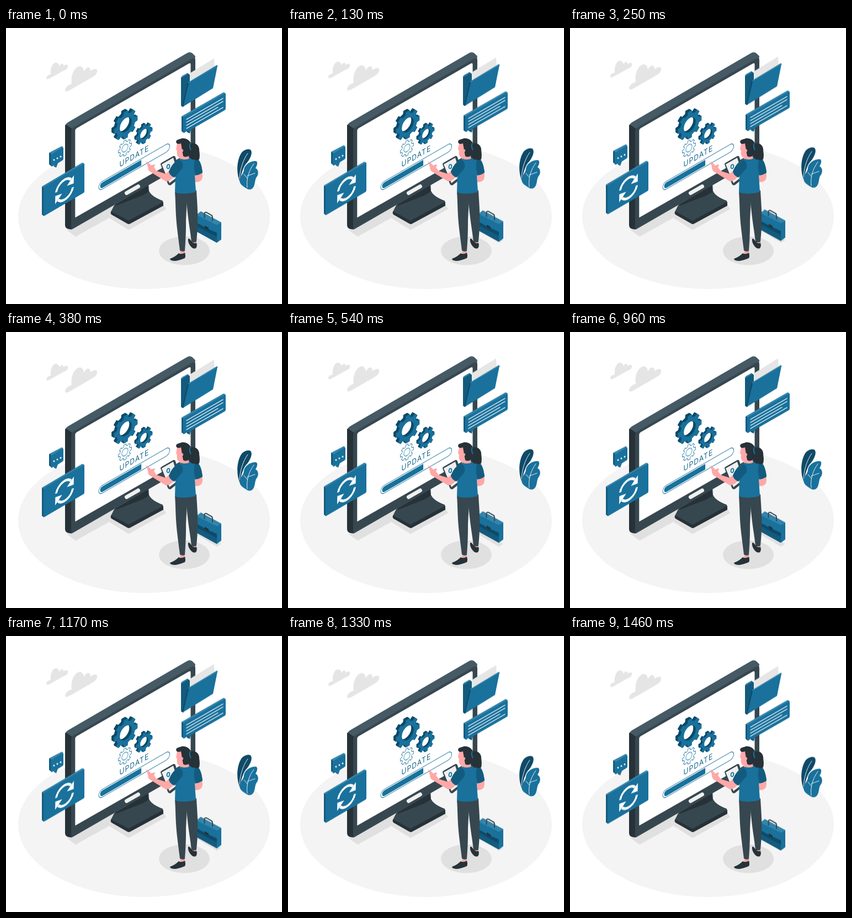
An HTML page for the animation above (1.5 s loop, 500 px wide and 500 px high).

```html
<!DOCTYPE html>
<html lang="en">
<head>
<meta charset="utf-8">
<title>Update</title>
<style>
  html, body { margin: 0; width: 100%; height: 100%; overflow: hidden; background: #fff; }
  svg { display: block; width: 100vw; height: 100vh; }
  .blue { fill: #19719c; }
  .light { fill: #3485ab; }
  .mid { fill: #135b7e; }
  .deep { fill: #0f4a68; }
  .night { fill: #263238; }
  .slate { fill: #37474f; }
  .steel { fill: #455a64; }
  .skin { fill: #ffa8a7; }
  .shade { fill: #e0e0e0; }
  .line { fill: none; stroke: #fff; stroke-linecap: round; stroke-linejoin: round; }
  .thin { fill: #fff; stroke: #19719c; }
  #float { animation: float 1.5s linear infinite; }
  @keyframes float {
    0%, 100% { transform: translateY(0); }
    50% { transform: translateY(-10px); }
  }
  text { font: 400 14px Inter, "Open Sans", sans-serif; letter-spacing: 1.2px; fill: #17658c; }
</style>
</head>
<body>
<svg viewBox="0 0 500 500" xmlns="http://www.w3.org/2000/svg">
  <g id="ground">
    <ellipse cx="250" cy="341.300" rx="228" ry="131.600" fill="#f4f4f4"/>
    <path class="shade" d="M110 366L126 378L187 344L222 366L290 328L284 318L200 315L118 362Z"/>
    <ellipse class="shade" cx="323" cy="403.500" rx="46" ry="26"/>
    <path class="shade" d="M344 366L382 389L390 384L352 362Z"/>
  </g>

  <g id="monitor">
    <path class="slate" d="M196 321L243 294V287L258 279L259 295Q263 305 284 313L285 318L222 351L190 333Z"/>
    <path class="night" d="M190 332L222 349L285 315V322L224 355Q222 356 219 354L191 338Q189 336 190 332Z"/>
    <path class="night" d="M197 320L243 293L257 284L258 297L246 304L199 322Z"/>
    <path class="steel" d="M107 177Q108 174 112 171L327 46Q333 42 338 46L343 51L342 58L120 187Z"/>
    <path class="night" d="M107 177Q107 174 110 176L119 182V365L112 364Q107 362 107 357Z"/>
    <path class="slate" d="M118 187Q118 183 122 180L336 56Q343 52 343 58V236L121 364Q118 366 118 362Z"/>
    <path fill="#fff" d="M125.300 186Q125.300 183 128 181.500L331 64.500Q334.500 62.500 334.500 66V224L125.300 343.500Z"/>
    <path class="line" stroke-width="7" style="stroke:#f0f0f0" d="M218.500 299L239.500 287"/>
  </g>

  <g id="screen">
    <g transform="matrix(.866 -.5 0 1 205.500 252.500)"><text>UPDATE</text></g>
    <g transform="matrix(.866 -.5 0 1 168 288.500)">
      <rect class="thin" y="-7" width="148.500" height="14" rx="7"/>
      <path class="blue" d="M8 -5H89V5H8A5 5 0 0 1 8 -5Z"/>
    </g>
  </g>

  <g id="float">
    <g fill="#e5e5e5">
      <path d="M74 93C71 88 76 85 81 84C80 75 83 65 89 63C93 62 96 65 97 69C100 63 105 64 104 69C108 65 114 66 112 71C111 75 107 76 103 78L78 92Z"/>
      <path d="M108 115C105 109 111 104 119 101C117 88 122 73 132 69.500C137 68 141 73 141 79C146 69 153 69 153 78C159 73 167 73 165 79C164 85 158 88 153 91L113 114Z"/>
    </g>

    <g id="folder">
      <path class="mid" d="M317 90L319 87L329 81.500L333 85V110L321 143L317 141Z"/>
      <path class="light" d="M317 89L328 82L330 83L319 90Z"/>
      <path fill="#e6e6e6" d="M333 82L377 55L378 72L334 98Z"/>
      <path class="light" d="M329 99L382 67L384 69L331 101Z"/>
      <path class="blue" d="M330 100L383 69L375 109L320 143Z"/>
      <path class="deep" d="M329 99L331 100L321 143L319 142Z"/>
    </g>

    <g id="note">
      <path class="light" d="M318 160L394 116.500L398 118L322 163Z"/>
      <path class="mid" d="M318 160L322 162V190L318 187Z"/>
      <path class="blue" d="M321 163Q321 162 323 161L396 118.500Q398 118 398 120V146Q398 148 396 149L335 184L333 191L327 187L323 190Q321 190 321 188Z"/>
      <path class="deep" d="M327 188L333 191L330 186Z"/>
      <path class="line" stroke-width="1.300" d="M327 165.500L393 127.500M327 171L393 133M327 176.500L384 143.500M327 182L393 144"/>
    </g>

    <g id="chat">
      <path class="light" d="M78 226L101 214L104 216L81 229Z"/>
      <path class="mid" d="M78 226L82 228V250L78 247Z"/>
      <path class="blue" d="M81 229L102 216.500Q104 216 104 218V237Q104 239 102 240L94 245L91 253L88 248L83 251Q81 251 81 249Z"/>
      <path class="deep" d="M88 248L91 253L86 250Z"/>
      <g fill="#fff"><circle cx="87" cy="239" r="1.500"/><circle cx="93" cy="236" r="1.500"/><circle cx="99" cy="233" r="1.500"/></g>
    </g>

    <g id="panel">
      <path class="light" d="M65 287L138 244L142 245L69 289Z"/>
      <path class="mid" d="M65 287L69 289V341L65 338Z"/>
      <path class="blue" d="M68 290Q68 288 70 287L140 246Q142 245 142 247V296Q142 298 140 299L70 340Q68 341 68 339Z"/>
      <g transform="matrix(.866 -.5 0 1 106 293)" id="sync"></g>
    </g>

    <g id="plant">
      <path class="deep" d="M423 277C417 262 418 240 426 227C431 220 441 217 444 222C447 228 441 240 434 247C429 254 426 266 423 277Z"/>
      <path class="blue" d="M438 292C430 287 423 284 423 275C425 266 431 264 431 256C433 246 445 240 453 241C457 243 455 249 452 254C458 256 458 266 454 270C450 276 452 284 447 290C444 293 441 293 438 292Z"/>
      <path class="line" stroke-width=".9" d="M423 273C424 255 430 238 438 227M437 289C435 274 440 258 449 246M437 268L451 263M437 272L431 265"/>
    </g>

    <g id="case">
      <path class="light" d="M344 339L353 332L390 352L382 358Z"/>
      <path class="blue" d="M344 338L382 357V389L344 368Z"/>
      <path class="mid" d="M344 352L364 363L382 371V389L344 368Z"/>
      <path class="deep" d="M344 352L364 363L382 371V378L364 369L344 358Z"/>
      <path class="blue" d="M382 357L390 352V383L382 389Z"/>
      <path class="night" d="M360 358L367 362V366L360 362Z"/>
      <path fill="none" stroke="#37474f" stroke-width="2" d="M359.500 344V336Q360 333 363 334L372 339Q374 340 374 343V350"/>
    </g>
  </g>

  <g id="woman">
    <path class="skin" d="M337 380H345V392L338 391Z"/>
    <path class="night" d="M330 382Q332 380 335 385Q340 392 345 389Q347 395 344 399Q339 401 335 396Q329 389 330 382Z"/>
    <path class="skin" d="M315 400H324V411L316 412Z"/>
    <path class="night" d="M297 418Q306 415 313 408Q318 411 324 407Q326 413 324 417Q314 421 307 422Q297 422 297 418Z"/>
    <path class="slate" d="M324 298L345 294C346 314 348 334 347 350C347 366 346 377 345 387Q340 390 336 387C334 367 330 350 327 314Z"/>
    <path class="slate" d="M306 297L329 298C328 316 326 340 326 354C326 376 325 390 324 404Q319 406 315 403C313 385 309 360 308 340C307 320 307 310 306 297Z"/>

    <path class="slate" d="M280 247Q280 245 282 244L303 232Q306 231 307 234L317 270L298 285Q294 285 293 282Z"/>
    <path fill="#f0f0f0" d="M282 247L303 235L313 268L296 281Z"/>
    <ellipse class="thin" cx="294" cy="251" rx="2.300" ry="3.600" stroke-width="1.800" transform="rotate(12 294 251)"/>

    <path class="skin" d="M340 260L355 261Q357 268 355 274Q351 280 343 279L338 270Z"/>
    <path class="skin" d="M296 259L305 268Q299 277 290 278C281 273 272 267 264 262C258 260 257 255 257 251L254 243Q256 241 258 244L263 249L269 247Q271 249 268 252L273 259L289 264Z"/>
    <path class="skin" d="M315 228H329L333 239Q323 245 315 239Z"/>
    <path class="blue" d="M317 237Q325 240 333 236L348 238C353 243 355 253 356 262Q349 267 342 267L344 297Q325 303 306 298L307 265L303 270Q296 266 295 260C301 246 308 239 317 237Z"/>
    <path class="mid" d="M314 239C320 241 322 249 319 255L305 271Q297 267 295 260C301 247 307 241 314 239Z"/>
    <path class="mid" d="M342 238L348 238C353 243 355 253 356 262Q349 267 343 266Q339 250 342 238Z"/>

    <path class="skin" d="M311 206C309 212 309 216 308 220L310 222C309 228 310 232 313 234Q319 236 324 232L328 219L322 206Z"/>
    <path class="night" d="M308 206C309 201 315 202 318 200C324 199 332 202 335 209C341 207 349 211 350 219C350 225 352 230 350 238Q345 241 341 238C337 240 333 236 332 230Q327 236 321 232L319 221L317 209Q309 212 308 206Z"/>
    <ellipse class="skin" cx="319.500" cy="222" rx="1.600" ry="2.600"/>
    <path fill="none" stroke="#19719c" stroke-width="2" d="M334 209Q331 214 335 221"/>
  </g>
</svg>
<script>
const NS = 'http://www.w3.org/2000/svg';
const $ = id => document.getElementById(id);

function add(parent, tag, attrs) {
  const el = document.createElementNS(NS, tag);
  for (const k in attrs) el.setAttribute(k, attrs[k]);
  return parent.appendChild(el);
}

// Outline of a cog with a round hole, centred on 0,0
function cog(r, root, hole, teeth) {
  const step = 2 * Math.PI / teeth, pts = [];
  for (let i = 0; i < teeth; i++) {
    for (const [f, rad] of [[-.3, root], [-.21, r], [.21, r], [.3, root]]) {
      const a = (i + f) * step;
      pts.push((rad * Math.cos(a)).toFixed(2) + ' ' + (rad * Math.sin(a)).toFixed(2));
    }
  }
  return `M${pts.join('L')}ZM${hole} 0A${hole} ${hole} 0 1 0 ${-hole} 0A${hole} ${hole} 0 1 0 ${hole} 0Z`;
}

const iso = (x, y) => `matrix(.866 -.5 0 1 ${x} ${y})`;

// Thickness recedes up and to the left, like the panels
function gear(x, y, d, depth) {
  for (let k = depth; k >= 0; k -= .5) {
    add($('screen'), 'path', {
      d, class: k ? 'deep' : 'blue', 'fill-rule': 'evenodd',
      transform: iso(x - k, y - k * .577)
    });
  }
}

gear(217, 175.5, cog(25, 20, 12.5, 8), 4.5);
gear(250.5, 192, cog(17.5, 13.5, 8.5, 8), 3);
add($('screen'), 'path', {
  d: cog(14, 11, 6.5, 8), class: 'thin', 'stroke-width': .9,
  'fill-rule': 'evenodd', transform: iso(215.5, 217.5)
});

for (const turn of [0, 180]) {
  const g = add($('sync'), 'g', { transform: `rotate(${turn})` });
  add(g, 'path', {
    d: 'M-17.500 -4.200A18 18 0 0 1 13.500 -11.900', class: 'line',
    'stroke-width': 4.6, style: 'stroke-linecap:butt'
  });
  add(g, 'path', { d: 'M19.600 -16.500L19.200 -2L5 -4.500Z', fill: '#fff' });
}
</script>
</body>
</html>
```
